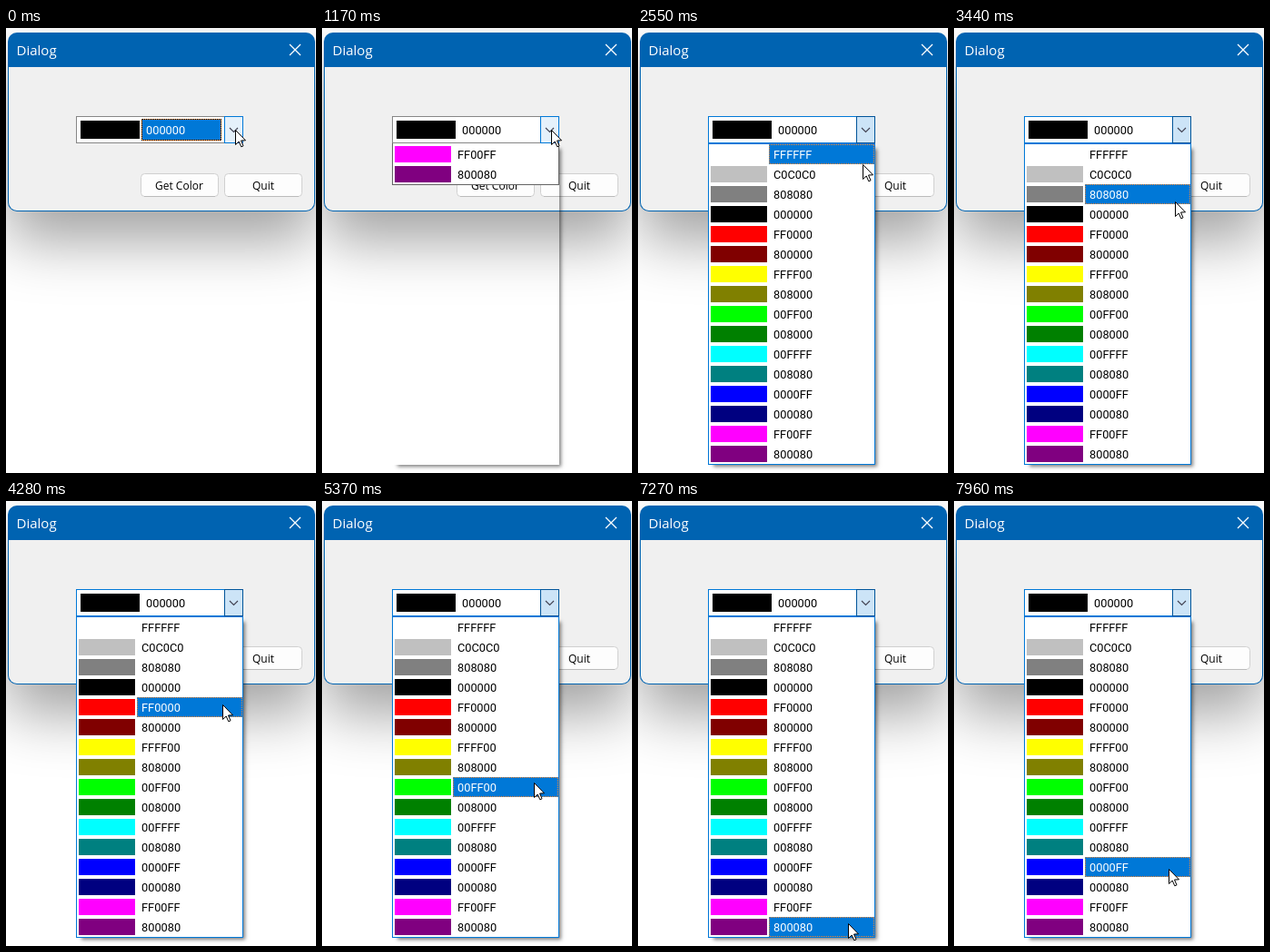
Write an HTML page with a canvas that moves like this. It is 341 by 490 pixels and loops after 7.99 s.

```html
<!DOCTYPE html>
<html lang="en">
<head>
<meta charset="utf-8">
<title>Dialog</title>
<style>
html, body { margin: 0; width: 100%; height: 100%; overflow: hidden; background: #fff; }
canvas { display: block; }
</style>
</head>
<body>
<canvas id="stage" width="341" height="490"></canvas>
<script>
const c = document.getElementById('stage').getContext('2d');
const LOOP = 7990, OPEN = 1170, OPENED = 1340;
const ROW = 22, TOP = 128;
const BLUE = '#0078d7', ORANGE = '#ff8728';
const LIST_FONT = '12.8px Roboto, sans-serif';
const UI_FONT = '12px "Open Sans", sans-serif';
const POPUP = [77, 127, 184, 354];

// Four grays, then each hue in full and half strength
const hues = ['100', '110', '010', '011', '001', '101'];
const colors = ['FFFFFF', 'C0C0C0', '808080', '000000'].concat(hues.flatMap(hue =>
  ['FF', '80'].map(v => [...hue].map(bit => bit > 0 ? v : '00').join(''))));

// Pointer key points: time, x, y
const path = [
  [1960, 252, 112], [2550, 247, 150], [3560, 242, 196], [4380, 238, 228],
  [5170, 233, 284], [5990, 231, 390], [6270, 232, 413], [6750, 231, 462],
  [7260, 231, 466], [7960, 236, 405]
];

function pointerAt(t) {
  const i = Math.max(1, path.findLastIndex(k => k[0] <= t) + 1);
  const a = path[i - 1], b = path[i] || a;
  const p = Math.max(0, (t - a[0]) / (b[0] - a[0] || 1));
  return [1, 2].map(n => Math.round(a[n] + (b[n] - a[n]) * p));
}

function box(x, y, w, h, fill, border) {
  if (fill) {
    c.fillStyle = fill;
    c.fillRect(x, y, w, h);
  }
  if (border) {
    c.strokeStyle = border;
    c.strokeRect(x + .5, y + .5, w - 1, h - 1);
  }
}

function round(x, y, w, h, r, fill) {
  c.beginPath();
  c.roundRect(x, y, w, h, r);
  c.fillStyle = fill;
  c.fill();
}

function line(points, color, width = 1) {
  c.beginPath();
  points.forEach(p => c.lineTo(...p));
  c.strokeStyle = color;
  c.lineWidth = width;
  c.stroke();
  c.lineWidth = 1;
}

function text(s, x, y, color, font) {
  c.font = font;
  c.fillStyle = color;
  c.fillText(s, x, y);
}

// Highlight with a dotted focus frame
function highlight(x, y, w, h, dots, gaps) {
  box(x, y, w, h, BLUE, gaps);
  if (!dots) return;
  c.setLineDash([1, 1]);
  c.lineDashOffset = .5;
  box(x, y, w, h, null, ORANGE);
  c.setLineDash([]);
}

function button(label, x, textX) {
  round(x + .5, 160.5, 85, 25, 4, '#fdfdfd');
  c.strokeStyle = '#d0d0d0';
  c.stroke();
  line([[x + 4, 185.5], [x + 82, 185.5]], '#bbb');
  text(label, textX, 178, '#000', UI_FONT);
}

function dialog() {
  c.save();
  c.shadowColor = 'rgba(0,0,0,.37)';
  c.shadowBlur = 64;
  c.shadowOffsetY = 32;
  round(2, 5, 338, 197, 10, '#0063b1');
  c.restore();
  round(3, 43, 336, 158, [0, 0, 9, 9], '#f0f0f0');
  text('Dialog', 11.5, 30, '#fff', '15px "Open Sans", sans-serif');
  line([[312, 18], [324, 30]], '#fff', 1.2);
  line([[324, 18], [312, 30]], '#fff', 1.2);
  button('Get Color', 148, 164);
  button('Quit', 240, 271);
}

function combo(t) {
  const pressed = t >= OPENED, focused = t < OPEN;
  box(77, 97, 184, 30, '#fff', pressed ? BLUE : '#868686');
  box(240, 97, 21, 30, pressed ? '#cce4f7' : '#e5f1fb', pressed ? '#005499' : BLUE);
  line([[246, 110], [250.5, 114.5], [255, 110]], '#404050', 1.1);
  box(82, 102, 65, 20, '#000');
  if (focused) highlight(149, 100, 88, 24, true, '#000');
  text('000000', 154, 117, focused ? '#fff' : '#000', LIST_FONT);
}

function list(t, pointerY) {
  const open = t >= OPENED;
  const step = Math.floor((t - OPEN) / 34);
  const hidden = open ? 0 : Math.round((.87 - .204 * step) * POPUP[3]);
  const selected = pointerY < TOP ? 3 : Math.floor((pointerY - TOP - .5) / ROW);

  // Drop shadow, outside the popup only
  c.save();
  c.beginPath();
  c.rect(0, 0, 341, 490);
  c.rect(...POPUP);
  c.clip('evenodd');
  c.shadowColor = 'rgba(0,0,0,.5)';
  c.shadowBlur = 4;
  c.shadowOffsetX = c.shadowOffsetY = 2;
  box(81, 131, 180, 350, '#888');
  c.restore();

  c.save();
  c.beginPath();
  c.rect(...POPUP);
  c.clip();
  c.translate(0, -hidden);
  box(...POPUP, '#fff', open ? BLUE : '#646464');
  colors.forEach((name, i) => {
    const y = TOP + i * ROW, on = i === selected;
    box(80, y + 2, 62, 18, '#' + name);
    if (on) highlight(144, y, 116, ROW, open);
    text(name, 149, y + 16, on ? '#fff' : '#000', LIST_FONT);
  });
  c.restore();
}

function pointer(x, y) {
  c.beginPath();
  [[0, 0], [0, 16], [3.7, 12.5], [6.3, 18.3], [8.5, 17.3], [6, 11.5], [11, 11.3]]
    .forEach(([dx, dy]) => c.lineTo(x + dx + .5, y + dy + .5));
  c.closePath();
  c.lineJoin = 'round';
  c.fillStyle = '#fff';
  c.fill();
  c.strokeStyle = '#000';
  c.stroke();
  c.lineJoin = 'miter';
}

function draw(t) {
  const [x, y] = pointerAt(t);
  box(0, 0, 341, 490, '#fff');
  dialog();
  combo(t);
  if (t >= OPEN) list(t, y);
  pointer(x, y);
}

const start = performance.now();
function tick() {
  draw((performance.now() - start) % LOOP);
  requestAnimationFrame(tick);
}
tick();
</script>
</body>
</html>
```
